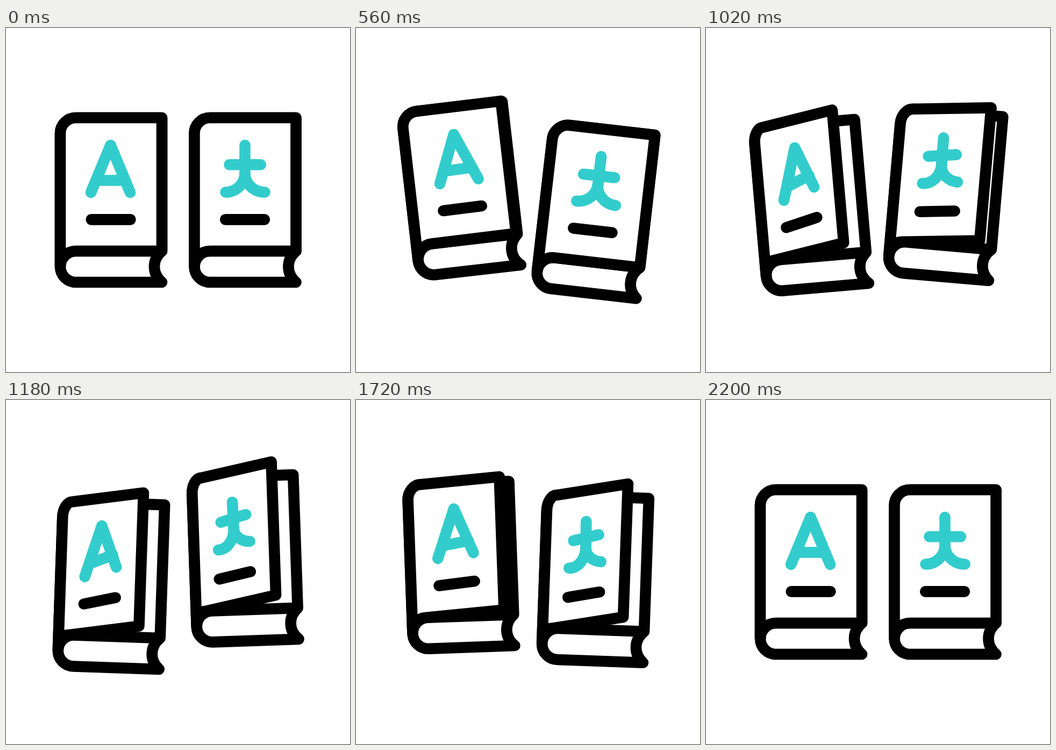
Write an HTML page with a canvas that moves like this. It is 640x640 px and loops after 2.4 s.

```html
<!DOCTYPE html>
<html lang="en">
<head>
<meta charset="utf-8">
<title>Two dictionaries</title>
<style>
html, body { margin: 0; width: 100%; height: 100%; overflow: hidden; background: #fff; }
canvas { display: block; width: 640px; height: 640px; }
</style>
</head>
<body>
<canvas id="stage" width="640" height="640"></canvas>
<script>
const ctx = document.getElementById('stage').getContext('2d');
const LOOP = 2400, STEP = 20;
const INK = '#000', TEAL = '#33cccc', PAPER = '#fff';
const RIGHT = 290, SPINE = 101, TOP = 167, MID = 415, LOW = 473, R = 29;
const HALF = Math.PI / 2;

const ease = p => (1 - Math.cos(Math.PI * p)) / 2;

// Eased value at time t from [time, value] keys
function track(keys, t) {
  if (t <= keys[0][0]) return keys[0][1];
  for (let i = 1; i < keys.length; i++) {
    const [t0, a] = keys[i - 1], [t1, b] = keys[i];
    if (t < t1) return a + (b - a) * ease((t - t0) / (t1 - t0));
  }
  return keys[keys.length - 1][1];
}

const lift = [[200, 0], [700, 25], [1200, -25], [1700, 12.5], [2200, 0]];
const tilt = [[200, 0], [800, 10], [1400, -7], [1800, 3], [2200, 0]];

const books = [
  { x: 195.5, dir: -1, rise: 21, glyph: latin, dip: 13.8,
    open: [[500, 0], [900, 1], [1450, 1], [1950, 0]] },
  { x: 445, dir: 1, rise: 25.5, glyph: han, dip: 12,
    open: [[800, 0], [1200, 1], [1700, 1], [2200, 0]] }
];

function stroke(color) {
  ctx.strokeStyle = color;
  ctx.stroke();
}

function line(...pts) {
  ctx.beginPath();
  pts.forEach(p => ctx.lineTo(p[0], p[1]));
}

// Point moved by (dx, dy) in proportion to the opening
const mover = f => (x, y, dx, dy) => [x + dx * f, y + dy * f];

function body() {
  ctx.beginPath();
  ctx.moveTo(RIGHT, MID);
  ctx.lineTo(RIGHT, TOP);
  ctx.arc(SPINE + R, TOP + R, R, -HALF, -2 * HALF, true);
  ctx.arc(SPINE + R, LOW - R, R, 2 * HALF, HALF, true);
  ctx.lineTo(RIGHT, LOW);
  ctx.bezierCurveTo(271.3, 457, 271.3, 431, RIGHT, MID);
  ctx.fillStyle = PAPER;
  ctx.fill();
  ctx.lineTo(SPINE + R, MID);
  ctx.arc(SPINE + R, LOW - R, R, -HALF, -2 * HALF, true);
  stroke(INK);
}

function cover(f, rise) {
  const rx = R - 11 * f, x = RIGHT - 40 * f, y = -rise * f;
  ctx.beginPath();
  ctx.moveTo(SPINE, LOW - R);
  ctx.ellipse(SPINE + rx, TOP + R, rx, R, 0, Math.PI, Math.PI + HALF);
  ctx.lineTo(x, TOP + y);
  ctx.lineTo(x, MID + y);
  ctx.lineTo(SPINE + rx, MID);
  ctx.ellipse(SPINE + rx, LOW - R, rx, R, 0, -HALF, -Math.PI, true);
  ctx.closePath();
  ctx.fillStyle = PAPER;
  ctx.fill();
  stroke(INK);
}

function latin(f) {
  const at = mover(f);
  line(at(158, 306, -12, -0.4), at(194.5, 218, -20, -8), at(231, 306, -27, -20));
  stroke(TEAL);
  line(at(167.4, 283.5, -14, -2), at(221.7, 283.5, -25, -20));
  stroke(TEAL);
}

function han(f) {
  const at = mover(f), knot = at(195, 270, -19, -7);
  line(at(195, 218, -20, -4), knot);
  stroke(TEAL);
  line(at(166, 254.3, -13.5, -3.5), at(224.5, 254.3, -25.3, -16.5));
  stroke(TEAL);
  for (const foot of [at(159, 305.5, -13, -3.4), at(232, 305.5, -27, -17.5)]) {
    const k = 0.552, [x, y] = foot, [kx, ky] = knot;
    ctx.beginPath();
    ctx.moveTo(kx, ky);
    ctx.bezierCurveTo(kx, ky + (y - ky) * k, x + (kx - x) * k, y, x, y);
    stroke(TEAL);
  }
}

function drawBook(b, t) {
  const f = track(b.open, t), at = mover(f);
  ctx.save();
  ctx.translate(b.x, 320 + b.dir * track(lift, t));
  ctx.rotate(b.dir * track(tilt, t) * Math.PI / 180);
  ctx.translate(-195.5, -320);
  body();
  cover(f, b.rise);
  b.glyph(f);
  line(at(158.7, 356.4, -12.7, 0), at(231.4, 356.4, -27, -b.dip));
  stroke(INK);
  ctx.restore();
}

const start = performance.now();

function frame() {
  const now = (performance.now() - start) % LOOP;
  const t = Math.floor(now / STEP) * STEP;
  ctx.fillStyle = PAPER;
  ctx.fillRect(0, 0, 640, 640);
  ctx.lineWidth = 20.6;
  ctx.lineCap = ctx.lineJoin = 'round';
  books.forEach(b => drawBook(b, t));
  requestAnimationFrame(frame);
}
frame();
</script>
</body>
</html>
```
